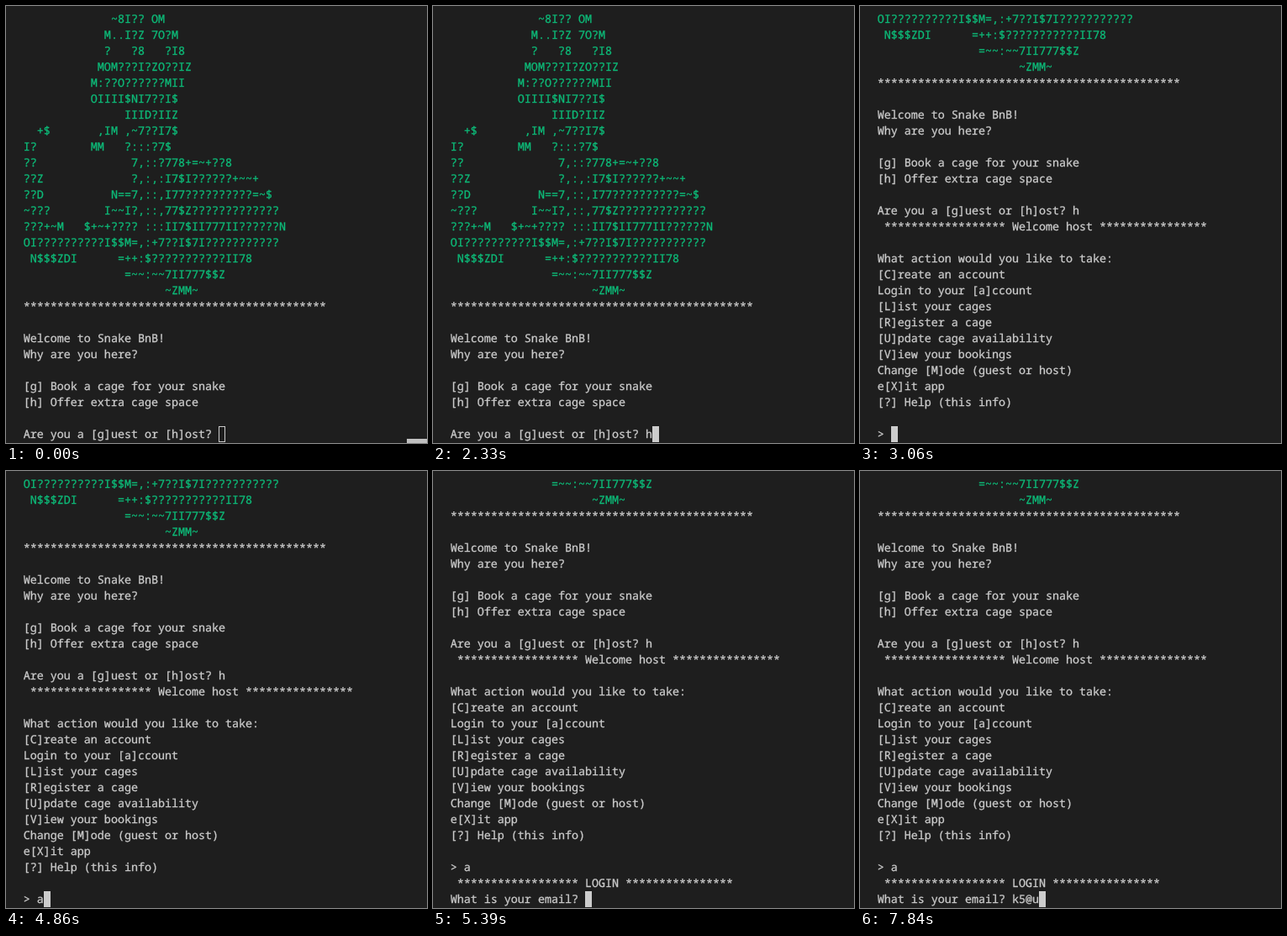
An HTML page for the animation above (8000 ms loop, 501 by 520 pixels).

```html
<!DOCTYPE html>
<html lang="en">
<head>
<meta charset="utf-8">
<title>Snake BnB terminal</title>
<style>
  html, body { margin: 0; width: 100%; height: 100%; overflow: hidden; background: #1e1e1e; }
  pre {
    position: absolute; left: 20.8px; top: 6px; margin: 0;
    font: 13.35px/19px "Noto Sans Mono", "DejaVu Sans Mono", monospace;
    text-rendering: geometricPrecision; font-variant-ligatures: none;
    color: #ccc; -webkit-text-stroke: 0.3px;
  }
  #art { color: #0dbc79; }
  #cursor {
    display: inline-block; width: 1ch; height: 19px; vertical-align: top;
    box-shadow: inset 0 0 0 1px #ccc; color: #1e1e1e;
  }
  #cursor.focused { background: #ccc; }
  #popup { position: absolute; left: 477px; width: 24px; top: 515px; height: 5px; background: #c0c0c0; }
</style>
</head>
<body>
<pre><span id="art"></span><span id="log"></span><span id="cursor"></span><span id="tail"></span></pre>
<div id="popup"></div>
<script>
const LOOP = 8000, ROWS = 27;

const art = `
             ~8I?? OM
            M..I?Z 7O?M
            ?   ?8   ?I8
           MOM???I?ZO??IZ
          M:??O??????MII
          OIIII$NI7??I$
               IIID?IIZ
  +$       ,IM ,~7??I7$
I?        MM   ?:::?7$
??              7,::?778+=~+??8
??Z             ?,:,:I7$I??????+~~+
??D          N==7,::,I77??????????=~$
~???        I~~I?,::,77$Z?????????????
???+~M   $+~+???? :::II7$II777II??????N
OI??????????I$$M=,:+7??I$7I???????????
 N$$$ZDI      =++:$???????????II78
               =~~:~~7II777$$Z
                     ~ZMM~`.slice(1).split('\n');

const stars = n => '*'.repeat(n);
const heading = title => `\n ${stars(18)} ${title} ${stars(16)}`;

const intro = `${stars(45)}

Welcome to Snake BnB!
Why are you here?

[g] Book a cage for your snake
[h] Offer extra cage space

Are you a [g]uest or [h]ost? `;

const menu = `
Login to your [a]ccount
[L]ist your cages
[R]egister a cage
[U]pdate cage availability
[V]iew your bookings
Change [M]ode (guest or host)
e[X]it app
[?] Help (this info)

> `;

// [time, appended text, cursor at start of the last line]
const steps = [
  [0, intro],
  [2330, 'h'],
  [2990, heading('Welcome host') + '\n\nWhat action would you like to take:\n[C]reate an account', true],
  [3060, menu],
  [4860, 'a'],
  [5320, heading('LOGIN'), true],
  [5390, '\nWhat is your email? '],
  [6180, 'k'],
  [6380, '5'],
  [7240, '@'],
  [7840, 'u'],
];

const el = id => document.getElementById(id);
const [artEl, logEl, cursorEl, tailEl, popup] = ['art', 'log', 'cursor', 'tail', 'popup'].map(el);

function showStep(count) {
  const done = steps.slice(0, count);
  const lines = done.map(step => step[1]).join('').split('\n');
  const top = art.length + lines.length - ROWS;
  const last = lines.pop();
  const col = done[count - 1][2] ? 0 : last.length;
  const visible = lines.slice(Math.max(0, top - art.length));
  artEl.textContent = art.slice(top).map(line => line + '\n').join('');
  logEl.textContent = visible.map(line => line + '\n').join('') + last.slice(0, col);
  cursorEl.textContent = last[col] || ' ';
  tailEl.textContent = last.slice(col + 1);
}

let shown = 0;
function draw(now) {
  const t = now % LOOP;
  const count = steps.filter(step => step[0] <= t).length;
  if (count !== shown) showStep(shown = count);
  cursorEl.className = t >= 540 ? 'focused' : '';
  popup.style.opacity = t < 70 ? 1 : t < 140 ? 0.5 : 0;
}

const start = performance.now();
function tick() {
  draw(performance.now() - start);
  requestAnimationFrame(tick);
}
tick();
</script>
</body>
</html>
```
